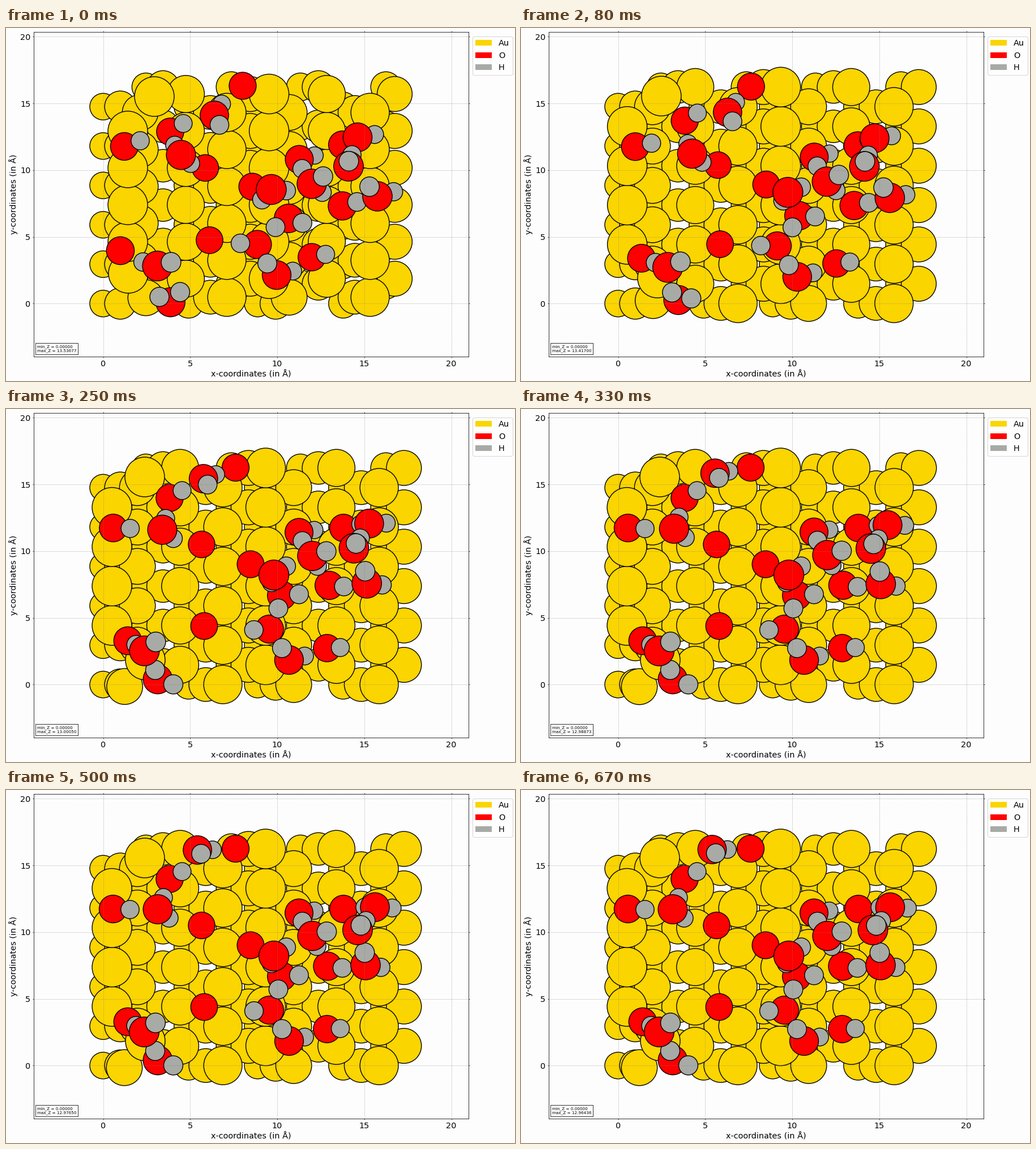
Animation, 899 px wide and 623 px high, one loop 710 ms. Source, as a matplotlib script:

```python
import numpy as np
import matplotlib.pyplot as plt
from matplotlib.animation import FuncAnimation
from matplotlib.patches import Patch

W, H, DPI = 899, 623, 72
LEFT, RIGHT, TOP, BOTTOM = 48.5, 816.5, 7.5, 580
X0, Y0, SX, SY = 171.5, 486.3, 30.75, 23.55      # pixel of the data origin, pixels per unit
COLORS = {"Au": "#fbd500", "O": "#ff0000", "H": "#a8aaa6"}
PAPER = "#fcfdfc"
FONT = 14.4

atoms = []                                       # in drawing order, lowest first


def atom(kind, r, start, end, tau=1.0):
    """Add an atom that relaxes from start to end within about tau poses."""
    atoms.append((kind, r, start, end, tau))


# Gold: a stepped slab of three layers, eight columns each. Its raised part
# starts squeezed towards the middle; three edge atoms leave their sites.
SQUEEZE = [5, 10, 7, 6, -8, -17, -16, 28]
STRAYS = {(7, 0): ((216, 433), (246, 443), 1.5),
          (7, 5): ((262, 121), (245, 120), 1.5),
          (0, 0): ((247, 476), (209, 490), 3)}

for layer in range(3):
    for col in range(8):
        half, i = divmod(col, 4)
        x = X0 + 30.3 * layer + 75.5 * i + (273 + 1.5 * layer) * half
        if x > 720:                              # periodic cell
            x -= 547.5
        r = 23.5 + 4.1 * layer + 1.1 * i
        for row in range(6):
            y = Y0 - 69.5 * row - 34.75 * (i % 2)
            if layer == 2 and (col, row) in STRAYS:
                atom("Au", r, *STRAYS[col, row])
                continue
            dx = dy = 0
            if r > 29:
                dx = SQUEEZE[col] if layer == 2 else 0.07 * (470 - x)
                dy = 0.062 * (305 - y)
            atom("Au", r, (x + dx, y + dy), (x, y))
atoms.sort(key=lambda a: a[1])

oxygen_r = 23.4


def molecule(start, end, tau, low=(), high=()):
    """One oxygen; hydrogens are (first offset, last offset), below or above it."""
    global oxygen_r
    oxygen_r += 0.135

    def bond(pairs, r):
        for first, last in pairs:
            atom("H", r, np.add(start, first), np.add(end, last), tau)

    bond(low, 0.62 * oxygen_r)
    atom("O", oxygen_r, start, end, tau)
    bond(high, 0.66 * oxygen_r)


molecule((352, 247), (345.5, 239), 2)
molecule((359.5, 374.5), (350, 383), 1.5)
molecule((435, 280), (432, 274), 2)
molecule((418, 102), (405.5, 103.5), 1.2)
molecule((290, 183), (289, 157), 1.7, high=[((23, -14.5), (22, -13))])
molecule((540, 404.5), (567, 422), 2, high=[((24.5, -5), (23.5, -1))])
molecule((594, 206), (596, 210), 3)
molecule((209, 209), (189, 210), 3, high=[((28, -10), (30, 1))])
molecule((202, 393), (215, 409), 1.5)
molecule((518, 232), (517.5, 217), 3.5, [((27, -7), (27, -4))], [((5, 16.5), (6, 15))])
molecule((444, 382), (465.5, 388.5), 2.8, high=[((-30, -2), (-27.5, 1.5))])
molecule((594, 314), (568, 311), 4, high=[((26, -7), (26, 3))])
molecule((368, 154), (337.5, 105), 6, [((13, -20), (27, 0))], [((9, 17), (6.5, 6.5))])
molecule((499, 336), (487, 329), 1.9,
         high=[((24.5, 8), (30.5, -2)), ((-23, 15.5), (-6, 23))])
molecule((478, 436), (500, 443), 2.6, [((28.5, -7), (27.5, -7))], [((-16.5, -20.5), (-12.5, -21))])
molecule((621, 193), (652, 207), 5.8, [((30, -5), (30.5, 1.5)), ((-9, 3), (-18, 0))])
molecule((290.5, 484), (268, 477), 2.2,
         high=[((17, -18), (27.5, 9)), ((-19.5, -9.5), (-4.5, -16.5))])
molecule((309, 224), (268, 210.5), 4.7, [((-11, -17), (10, -20.5)), ((17, 15), (20, 15.5))])
molecule((540, 275), (541, 257.5), 4, [((18.5, 15), (8, 18.5))], [((20, -13), (25.5, -7.5))])
molecule((656, 297), (635, 309), 4, [((28.5, -8), (27, 4))], [((-14, -17), (-1.5, -22))])
molecule((605, 244), (621.5, 247), 6.5, [((6, -20), (15, -16))], [((0.5, -9), (6, -8))])
molecule((267.5, 420), (244, 427), 3, [((-25.5, -7), (-14.5, -11))], [((24, -6.5), (20, -16))])
molecule((468.5, 285), (473, 293), 2, [((-16.5, 18), (-4, 13)), ((26.5, 2), (22, -15.5))])

kinds, radii, starts, ends, taus = (list(part) for part in zip(*atoms))
starts, ends = ((np.array(p, float) - (X0, Y0)) / (SX, -SY) for p in (starts, ends))
taus = np.array(taus)[:, None]

plt.rcParams["font.family"] = "DejaVu Sans"
fig = plt.figure(figsize=((W + 0.01) / DPI, (H + 0.01) / DPI), dpi=DPI, facecolor=PAPER)
ax = fig.add_axes([LEFT / W, 1 - BOTTOM / H, (RIGHT - LEFT) / W, (BOTTOM - TOP) / H],
                  facecolor=PAPER)
ax.set_xlim((LEFT - X0) / SX, (RIGHT - X0) / SX)
ax.set_ylim((Y0 - BOTTOM) / SY, (Y0 - TOP) / SY)
ax.set_xticks(range(0, 21, 5))
ax.set_yticks(range(0, 21, 5))
ax.tick_params(labelsize=FONT, length=2, width=0.7, pad=4, top=True, right=True)
ax.tick_params(axis="y", pad=3)
ax.grid(color="gray", linestyle=":", linewidth=0.7)
for spine in ax.spines.values():
    spine.set_linewidth(0.8)
ax.legend(handles=[Patch(color=c, label=name, linewidth=0) for name, c in COLORS.items()],
          loc="upper left", bbox_to_anchor=(1, 1), fontsize=FONT)
fig.text(432.5 / W, 1 - 615.5 / H, "x-coordinates (in Å)", size=FONT, ha="center", va="baseline")
fig.text(17.5 / W, 1 - 293.5 / H, "y-coordinates (in Å)", size=FONT, ha="center", va="baseline",
         rotation=90, rotation_mode="anchor")
note = fig.text(55 / W, 1 - 573.4 / H, "", size=FONT / 2, va="bottom", linespacing=1.2,
                bbox=dict(boxstyle="square,pad=0.38", fc=PAPER, ec="black", lw=0.8))
dots = ax.scatter(*starts.T, s=np.square(2 * np.array(radii)), c=[COLORS[k] for k in kinds],
                  edgecolors="black", linewidths=1.4, zorder=1)

# The highest atom's z, at a few poses.
POSES = [0, 2, 4, 6, 10, 14, 16]
MAX_Z = [13.53677, 13.41700, 13.11474, 13.00050, 12.97695, 12.97605, 12.96436]


def draw(tick):
    pose = int((tick + 0.49) * 0.24)             # 24 poses a second on a 10 ms clock
    done = 1 - np.exp(-(pose / taus) ** 2)
    dots.set_offsets(starts + done * (ends - starts))
    note.set_text(f"min_Z = 0.00000\nmax_Z = {np.interp(pose, POSES, MAX_Z):.5f}")
    return dots, note


anim = FuncAnimation(fig, draw, frames=71, interval=10, repeat=True, repeat_delay=0)
plt.show()
```
